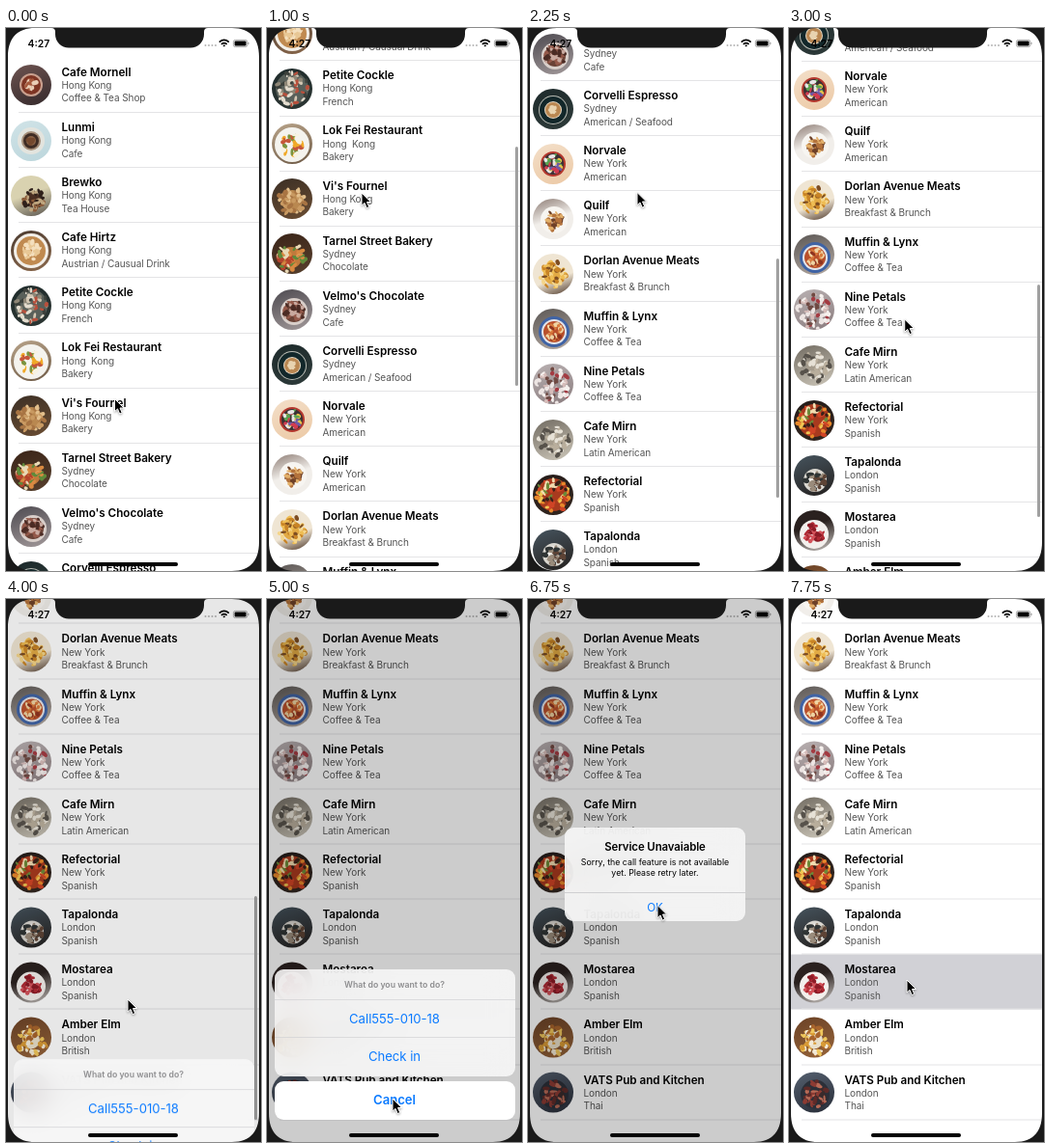
Recreate the animation shown at these times as an HTML page. Size 264 by 563 pixels, loop 8 s.

```html
<!DOCTYPE html>
<html lang="en">
<head>
<meta charset="utf-8">
<title>Restaurant list</title>
<style>
  html, body { margin: 0; width: 264px; height: 563px; overflow: hidden; background: #fff; }
  body { position: relative; font-family: Inter, sans-serif; }
  body > * { position: absolute; }
  .cover { left: 0; top: 0; width: 264px; height: 563px; }
  #list { left: 2px; top: 30.8px; width: 260px; }
  .row { position: relative; height: 57.15px; }
  .row::after { content: ""; position: absolute; left: 11px; right: 0; bottom: 0; height: 1px; background: #e4e4e6; }
  .row.pressed { background: #d1d1d6; }
  .row svg { position: absolute; left: 3px; top: 7.6px; width: 42px; height: 42px; border-radius: 50%; }
  .row p { position: absolute; left: 55.5px; top: 8.5px; margin: 0; white-space: pre;
           font-size: 10px; line-height: 13.6px; letter-spacing: -.08px; color: #555; }
  .row b { display: block; position: relative; top: .4px; font-size: 11.7px; font-weight: 600; letter-spacing: -.03px; color: #000; }
  #bar { left: 257px; width: 2.8px; border-radius: 2px; background: #a0a0a0; }
  #dim { background: #000; }
  #sheet { left: 7.5px; top: 384px; width: 249px; text-align: center; color: #0a7aff; font-size: 13.1px; line-height: 39.5px; }
  .card { border-radius: 9px; background: rgba(248, 248, 248, .87); backdrop-filter: blur(14px); overflow: hidden; }
  .card + .card { margin-top: 5.5px; background: #fff; font-weight: 600; }
  .card div + div { box-shadow: 0 -.7px #d2d2d4; }
  .head { height: 31.5px; line-height: 32px; font-size: 8.7px; font-weight: 600; color: #8d8d8f; }
  #alert { left: 38px; top: 237px; width: 187px; height: 97px; text-align: center; color: #000; }
  #alert * { position: absolute; left: 0; width: 100%; }
  #alert b { top: 13px; font-size: 11.4px; line-height: 15px; font-weight: 600; letter-spacing: -.08px; }
  #alert p { top: 29.5px; margin: 0; font-size: 8.8px; line-height: 11.4px; white-space: pre; }
  #alert div { top: 66.5px; height: 30.5px; line-height: 31px; font-size: 11.6px; color: #0a7aff; border-top: .7px solid #cfcfd1; }
  #cursor { filter: drop-shadow(0 1.5px 1.2px rgba(0, 0, 0, .35)); }
</style>
</head>
<body>
<div id="list"></div>
<div id="bar"></div>
<svg class="cover">
  <text x="22.5" y="19.7" font-size="10.4" font-weight="600">4:27</text>
  <g fill="#b5b5b5"><circle cx="206.5" cy="18" r="1"/><circle cx="210" cy="18" r="1"/><circle cx="213.5" cy="18" r="1"/><circle cx="217" cy="18" r="1"/></g>
  <g fill="none" stroke="#000" stroke-width="1.7"><path d="M220.8 14.6q5-4.4 10 0M222.9 16.8q2.9-2.5 5.8 0"/></g>
  <path d="M224.3 18q1.5-1.2 3 0l-1.5 1.6z"/>
  <rect x="235.4" y="12.4" width="14.4" height="7.2" rx="2" fill="none" stroke="#999" stroke-width=".8"/>
  <rect x="236.6" y="13.5" width="12" height="5" rx="1"/><rect x="250.4" y="14.8" width="1" height="2.4" rx=".5" fill="#999"/>
</svg>
<div id="dim" class="cover"></div>
<div id="sheet">
  <div class="card"><div class="head">What do you want to do?</div><div id="call"></div><div>Check in</div></div>
  <div class="card">Cancel</div>
</div>
<div id="alert" class="card"><b>Service Unavaiable</b><p>Sorry, the call feature is not available
yet. Please retry later.</p><div>OK</div></div>
<svg class="cover">
  <rect x="85" y="554" width="93" height="4" rx="2"/>
  <path fill="#1a1a1a" fill-rule="evenodd" d="M0 0H264V563H0ZM2 30C2 10 12 0 30 0H47q4 0 4 4v2.5a14 14 0 0 0 14 14H191a14 14 0 0 0 14-14V4q0-4 4-4H234C252 0 262 10 262 30V533C262 553 252 563 234 563H30C12 563 2 553 2 533Z"/>
  <path id="cursor" d="M0 0V13.2L3 10.4L5.2 15.6L7.7 14.5L5.5 9.5H9.6Z" stroke="#fff" stroke-width="1" stroke-linejoin="round"/>
</svg>
<script>
const $ = id => document.getElementById(id);

// name, city, kind, backdrop colours, discs (colour and radius), bit colours, spread, centre
const places = [
  ["Cafe Mornell", "Hong Kong", "Coffee & Tea Shop", "#6d5350,#352a2c", "#c9a08f 12 #7e3524 10", "#e9cdb6 #a5583c", 5, 0, 0],
  ["Lunmi", "Hong Kong", "Cafe", "#d0e3e7,#bcd6dc", "#e3e4de 14 #a58e79 10 #3f2c24 8 #8a6347 5", "#74492f", 2, 0, 0],
  ["Brewko", "Hong Kong", "Tea House", "#d9d2b0 45%,#55504a", "#4a2f22 8", "#2f211b #8a5a38 #bfa67f", 11, 2, 4],
  ["Cafe Hirtz", "Hong Kong", "Austrian / Causual Drink", "#4b3a30,#8c6a4d", "#f3efe8 18 #c08a50 15", "#f4dfbd #e8c795", 9, 0, 0],
  ["Petite Cockle", "Hong Kong", "French", "#1f2b2b,#2c3633", "#59605a 17", "#d3c7b3 #8e8676 #e4ddcf #3c403b #b8503c", 17, 0, 0],
  ["Lok Fei Restaurant", "Hong  Kong", "Bakery", "#b9a48a,#6d5945", "#f4f3ee 18", "#f0a928 #7a9440 #f7f2e2 #c5563a", 11, 0, 1],
  ["Vi's Fournel", "Hong Kong", "Bakery", "#3b2f25,#6b4d33", "#b98850 11", "#c99a62 #e2bf8c #a87443", 14, 0, 2],
  ["Tarnel Street Bakery", "Sydney", "Chocolate", "#3a2418,#57402d", "#c07a3c 11", "#5f8a3a #d98a41 #e9d9b5 #b5432c", 15, -1, 4],
  ["Velmo's Chocolate", "Sydney", "Cafe", "#4d4a50,#a39a9b", "#d9cfca 14 #6a4236 11", "#4b2b24 #94594a #c9a99f", 11, 2, 2],
  ["Corvelli Espresso", "Sydney", "American / Seafood", "#1d2a2b,#2e3b3a", "#b9bbb3 15 #12272a 14 #e4dac8 9 #b98752 8", "#e8d3b0", 3, 0, 1],
  ["Norvale", "New York", "American", "#f3dfc9,#ecc9a5", "#b5382e 13 #3c3034 11", "#d23c50 #5aa352 #e7c34b #e9e5e6 #6e5aa6", 9, 0, 0],
  ["Quilf", "New York", "American", "#8c7b73,#f1eeea 50%", "#f7f5f1 14", "#b3723c #6e4128 #e2b06b", 9, 1, 1],
  ["Dorlan Avenue Meats", "New York", "Breakfast & Brunch", "#efe5d3 60%,#4a3426", "#e2aa44 10", "#eebd54 #c98425 #f4d58a #7d4d22", 14, 0, 1],
  ["Muffin & Lynx", "New York", "Coffee & Tea", "#5a5654,#b7aca4", "#3f63a5 16 #e5e5e8 13 #b9502c 11", "#d97a3c #8f3420 #efd3a2", 8, 1, 3],
  ["Nine Petals", "New York", "Coffee & Tea", "#b9b1b2,#8a7c7e", "", "#ede5e3 #d6bcb9 #6f4a43 #a33b42 #f6f1ee", 18, 0, 2],
  ["Cafe Mirn", "New York", "Latin American", "#716b61,#cdc7ba", "#a59c8d 9", "#e6e1d6 #57524b #b9ae9c", 16, 1, 2],
  ["Refectorial", "New York", "Spanish", "#241c1a,#33261f", "#a83a1e 17", "#e8892b #d04426 #f0c653 #6c8a38 #f2dcb0 #3b2019", 18, 0, 0],
  ["Tapalonda", "London", "Spanish", "#46545e,#24201e", "#dad7d0 12 #f0eeea 9", "#5d4335 #9a8c7c #2f3434", 11, 1, 5],
  ["Mostarea", "London", "Spanish", "#2a211f 40%,#c9c4c0", "#f3efec 15", "#b02a34 #8c1b26 #d3525a", 10, 0, 4],
  ["Amber Elm", "London", "British", "#6b4226,#96643a", "#e9dfc9 9", "#d89a35 #f0c75c #a8642c #f3ead6", 15, 0, 3],
  ["VATS Pub and Kitchen", "London", "Thai", "#55606f,#272c37", "#2b2f38 15", "#8c3b33 #5f2a28 #b86a56 #3a2a2b", 13, 1, 2],
];

function photo(seed, backdrop, discs, bits, spread, cx, cy) {
  let n = seed * 31 + 7;
  const random = () => (n = (n * 16807) % 2147483647) / 2147483647;
  for (let i = 0; i < 5; i++) random();
  const colours = bits.split(" ");
  let shapes = "";
  for (const [, colour, r] of discs.matchAll(/(#\w+) (\d+)/g))
    shapes += `<circle r="${r}" fill="${colour}"/>`;
  for (let i = 0; i < 4 + spread * 3; i++) {
    const angle = random() * 6.28, d = Math.sqrt(random()) * spread;
    const x = Math.cos(angle) * d, y = Math.sin(angle) * d;
    shapes += `<ellipse rx="${1.6 + random() * 2.4}" ry="${1 + random() * 1.6}" fill="${colours[i % colours.length]}"
      transform="translate(${x} ${y}) rotate(${random() * 180})"/>`;
  }
  return `<svg viewBox="-21 -21 42 42" style="background:linear-gradient(160deg,${backdrop})">
    <g transform="translate(${cx} ${cy})">${shapes}</g></svg>`;
}

$("list").innerHTML = places.map(([name, city, kind, ...look], i) =>
  `<div class="row">${photo(i, ...look)}<p><b>${name}</b>${city}\n${kind}</p></div>`).join("");

const linear = k => k;
const smooth = k => k * k * (3 - 2 * k);

// Interpolates rows of [position, ...values].
function track(keys, at, ease = smooth) {
  let i = 1;
  while (i < keys.length - 1 && at > keys[i][0]) i++;
  const a = keys[i - 1], b = keys[i];
  const k = ease(Math.min(1, Math.max(0, (at - a[0]) / (b[0] - a[0]))));
  return a.slice(1).map((v, j) => v + (b[j + 1] - v) * k);
}

const scrollKeys = [[0, 0], [1000, 225], [1400, 238], [2250, 490], [2600, 500], [3600, 690.5]];
const barKeys = [[0, 25, 272], [225, 123, 371], [490, 239, 487], [690.5, 308, 540]];
const sheetKeys = [[3750, 0], [4000, .48], [4250, 1], [5000, 1], [5500, 0], [6000, 1], [6250, 1], [6500, 0]];
const alertKeys = [[6250, 0], [6750, 1], [7000, 1], [7500, 0]];
const cursorKeys = [[0, 112.5, 384.5], [1000, 98, 171], [1500, 114, 380], [2250, 113, 170.5], [2750, 118, 372],
  [3300, 122, 210], [3900, 126, 415], [4000, 126, 415], [5000, 130, 518], [5500, 120, 438], [5750, 120, 438],
  [6250, 130, 432], [6750, 134, 317.5], [7000, 134, 317.5], [7500, 122, 395]];

const STEP = 250, LOOP = 8000;
const rows = document.querySelectorAll(".row");

function draw(now) {
  const t = Math.floor(now % LOOP / STEP) * STEP;
  const [scroll] = track(scrollKeys, t);
  const [top, bottom] = track(barKeys, scroll, linear);
  const [sheet] = track(sheetKeys, t);
  const [alert] = track(alertKeys, t);
  const [x, y] = track(cursorKeys, t);

  $("list").style.transform = `translateY(${-scroll}px)`;
  rows[18].classList.toggle("pressed", t >= 7750);

  $("bar").style.top = top + "px";
  $("bar").style.height = bottom - top + "px";
  $("bar").hidden = t === 0 || t > 4000;

  $("dim").style.opacity = .2 * Math.max(sheet, alert);
  $("call").textContent = "Call555-010-" + (t < 5500 ? 18 : 19);
  $("sheet").style.transform = `translateY(${(1 - sheet) * 179}px)`;
  $("sheet").hidden = sheet === 0;
  $("alert").style.opacity = alert;
  $("alert").hidden = alert === 0;
  $("cursor").setAttribute("transform", `translate(${x} ${y})`);
  requestAnimationFrame(draw);
}
requestAnimationFrame(draw);
</script>
</body>
</html>
```
